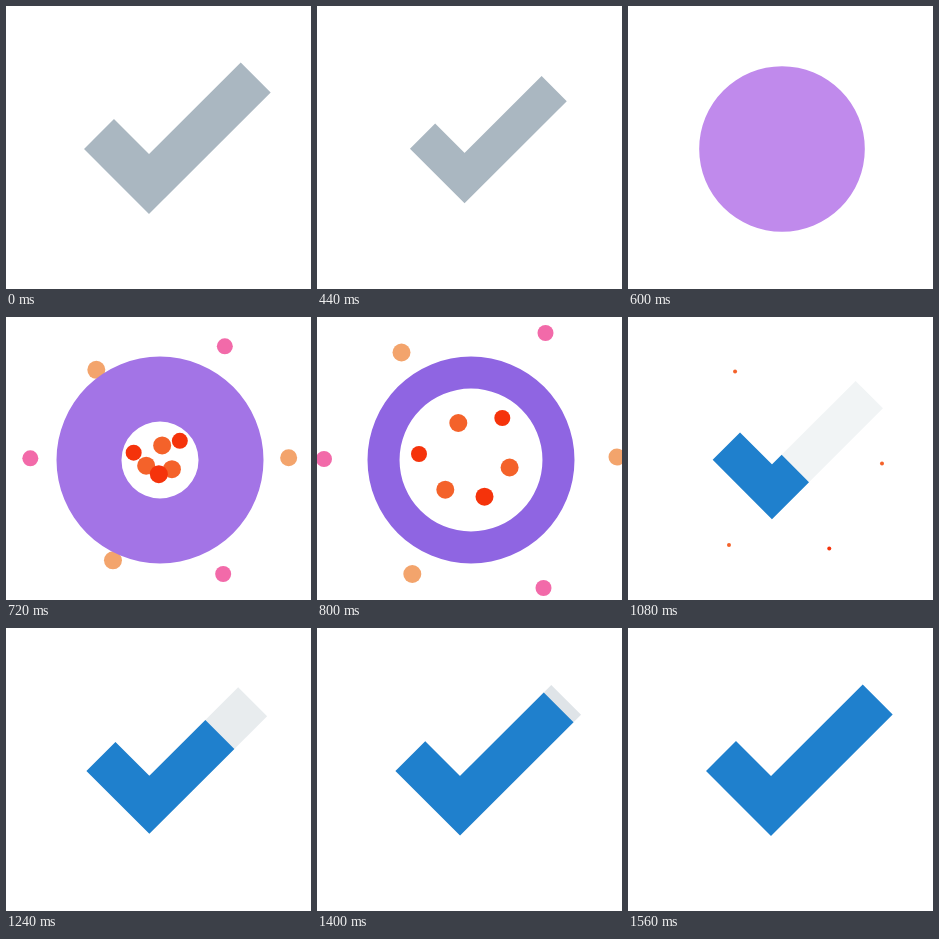
Animation of 305 by 283 pixels, one loop 2.44 s. Source, as an HTML page with a canvas:

```html
<!DOCTYPE html>
<html lang="en">
<head>
<meta charset="utf-8">
<title>Check burst</title>
<style>
  html, body { margin: 0; width: 100%; height: 100%; overflow: hidden; background: #fff; }
  canvas { display: block; width: 305px; height: 283px; }
</style>
</head>
<body>
<canvas id="stage"></canvas>
<script>
const W = 305, H = 283, LOOP = 2440, STEP = 40;
const CX = 154, CY = 143, RING = 103.5;
const CHECK_LENGTH = 221.6;
const GREY = '#aab7c1', BLUE = '#1f80cd';
const RED = '#f5330b', ORANGE = '#f4622a', TAN = '#f3a46c', PINK = '#f26aa9';

const canvas = document.getElementById('stage');
const ctx = canvas.getContext('2d');
const dpr = window.devicePixelRatio || 1;
canvas.width = Math.round(W * dpr);
canvas.height = Math.round(H * dpr);

// x, y, dx, dy, radius, shrink, colour: a place on the way and the travel from it
const outerDots = [
  [84.5, 35.5, -8.7, -26, 9, 2, TAN],
  [228.5, 16, 14.5, -20, 8, 3.5, PINK],
  [7, 142, -26, 1, 8, 3.5, PINK],
  [300, 140, 26, -1, 8.5, 2, TAN],
  [95.3, 257, -17.5, 20.5, 9, 2, TAN],
  [226.5, 271, 14, 21, 8, 3.5, PINK]
];
const innerDots = [
  [141.3, 106, -22.3, -33.6, 9, 3, ORANGE],
  [185.3, 101, 17.2, -34.2, 8, 3.5, RED],
  [102, 137, -38.5, 2, 8, 3.5, RED],
  [192.6, 150.5, 40, -2.6, 9, 3, ORANGE],
  [128.3, 172.7, -17.8, 36.1, 9, 3, ORANGE],
  [167.5, 179.7, 22, 33.7, 9, 3, RED]
];

const clamp = v => Math.min(1, Math.max(0, v));
const progress = (t, from, to) => clamp((t - from) / (to - from));
const easeOut = (p, power) => 1 - Math.pow(1 - p, power);
const mix = (a, b, p) => Math.round(a + (b - a) * p);

function disc(x, y, r, color) {
  if (r <= 0) return;
  ctx.fillStyle = color;
  ctx.beginPath();
  ctx.arc(x, y, r, 0, Math.PI * 2);
  ctx.fill();
}

function drawCheck(scale, ox, oy, color, alpha = 1, part = 1) {
  if (scale <= 0 || alpha <= 0 || part <= 0) return;
  ctx.save();
  ctx.translate(ox, oy);
  ctx.scale(scale, scale);
  ctx.translate(-ox, -oy);
  ctx.globalAlpha = alpha;
  ctx.strokeStyle = color;
  ctx.lineWidth = 42.4;
  ctx.lineJoin = 'miter';
  if (part < 1) ctx.setLineDash([part * CHECK_LENGTH, 1000]);
  ctx.beginPath();
  ctx.moveTo(93, 128);
  ctx.lineTo(143, 178);
  ctx.lineTo(249.7, 71.5);
  ctx.stroke();
  ctx.restore();
}

function drawDots(dots, t) {
  if (t < 660) return;
  const k = (t - 800) / 120;
  const travel = k < 1 ? k : 1 + 0.6 * (1 - Math.exp((1 - k) / 0.6));
  const grow = progress(t, 640, 720);
  for (const [x, y, dx, dy, r, shrink, color] of dots) {
    disc(x + dx * travel, y + dy * travel, r * grow - shrink * Math.max(0, k), color);
  }
}

function drawRing(t) {
  const r = RING * easeOut(progress(t, 480, 697), 2);
  const hole = RING * easeOut(progress(t, 640, 920), 1.384);
  if (r <= hole) return;
  const p = (t - 600) / 200;
  ctx.fillStyle = `rgb(${mix(192, 143, p)}, ${mix(138, 101, p)}, ${mix(236, 226, p)})`;
  ctx.beginPath();
  ctx.arc(CX, CY, r, 0, Math.PI * 2);
  ctx.arc(CX, CY, hole, 0, Math.PI * 2, true);
  ctx.fill();
}

function drawNewCheck(t) {
  const rest = 1 - Math.min(1, (t - 920) / 640);
  const scale = 1 - 0.18 * Math.pow(rest, 2.5);
  const part = easeOut(progress(t, 908, 1560), 2.15);
  if (part < 1) drawCheck(scale, 154, 141.5, GREY, (t - 840) / 1480);
  drawCheck(scale, 154, 141.5, BLUE, 1, part);
}

function draw(t) {
  ctx.setTransform(dpr, 0, 0, dpr, 0, 0);
  ctx.fillStyle = '#fff';
  ctx.fillRect(0, 0, W, H);
  if (t < 600) {
    const k = t < 440 ? 0 : (t - 400) / 40;
    drawCheck(1 - 0.16 * Math.pow(k, 1.2), 171.5, 141.5, GREY);
  }
  drawDots(outerDots, t);
  drawRing(t);
  if (t > 840) drawNewCheck(t);
  drawDots(innerDots, t);
}

const start = performance.now();
function tick() {
  const t = (performance.now() - start) % LOOP;
  draw(Math.floor(t / STEP) * STEP);
  requestAnimationFrame(tick);
}
tick();
</script>
</body>
</html>
```
